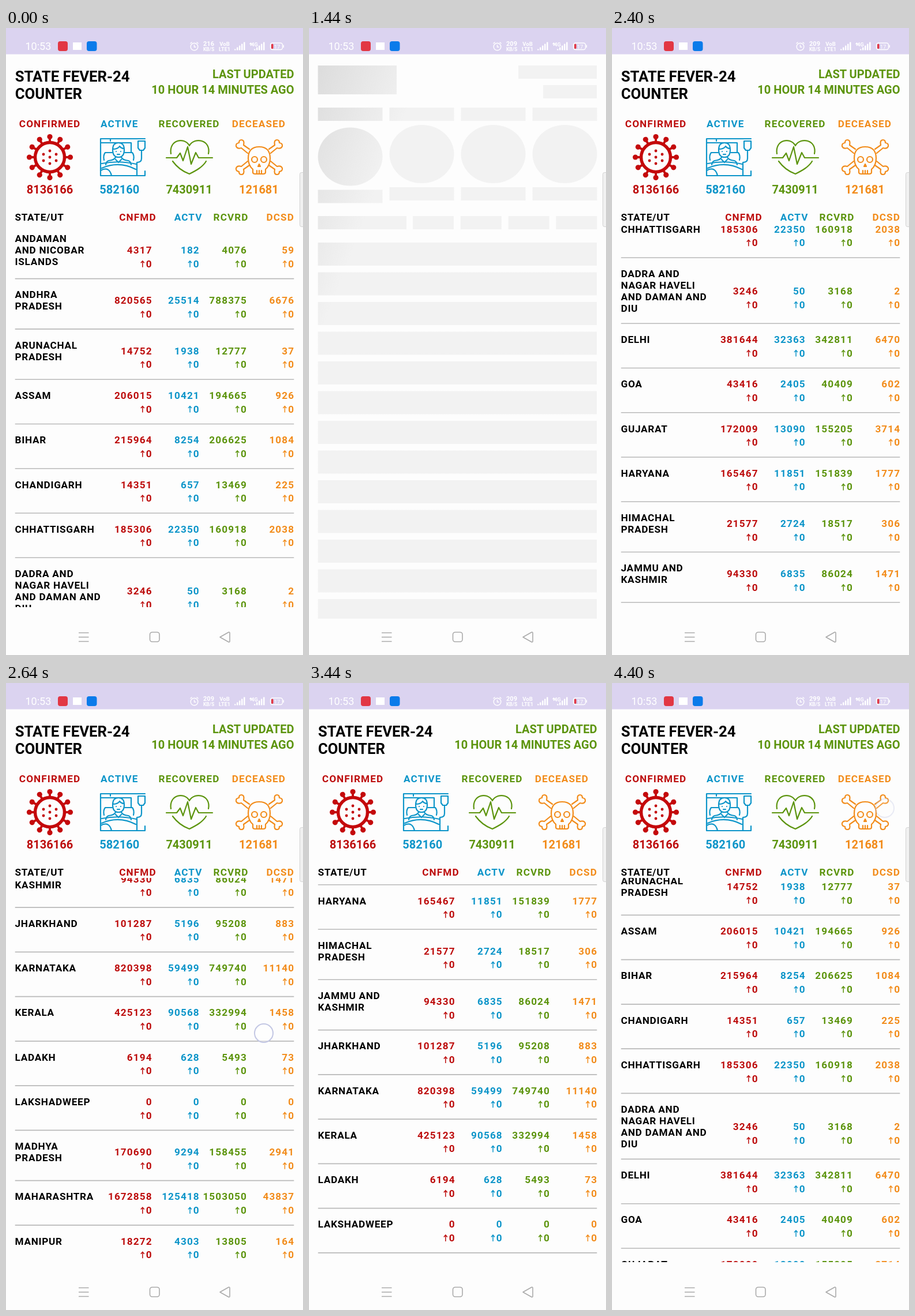
Recreate the animation shown at these times as an HTML page. Size 515 by 1087 pixels, loop 4480 ms.

```html
<!DOCTYPE html>
<html lang="en">
<head>
<meta charset="utf-8">
<title>Case counter</title>
<style>
  html, body { margin: 0; width: 100%; height: 100%; overflow: hidden; background: #fdfdfd; }
  svg { display: block; width: 515px; height: 1087px; font-family: Roboto, sans-serif; font-weight: 700; }
  .line { fill: none; stroke-width: 2.2; stroke-linecap: round; stroke-linejoin: round; }
  .spaced { font-size: 17.17px; letter-spacing: 1.1px; }
  .state { font-size: 17.17px; letter-spacing: .72px; }
  .mid { text-anchor: middle; }
  .end { text-anchor: end; }
</style>
</head>
<body>
<svg viewBox="0 0 515 1087">
  <defs>
    <clipPath id="listClip"><rect y="338" width="515" height="666"/></clipPath>
    <linearGradient id="shine" gradientUnits="userSpaceOnUse" x1="-177" y1="-68" x2="177" y2="68">
      <stop offset="0" stop-color="#f2f2f2"/>
      <stop offset=".5" stop-color="#dadada"/>
      <stop offset="1" stop-color="#f2f2f2"/>
    </linearGradient>
  </defs>
  <rect width="515" height="1087" fill="#fdfdfd"/>

  <g id="statusBar" fill="#fff">
    <rect width="515" height="45.5" fill="#dbd3f0"/>
    <text x="33.5" y="38" font-size="18" font-weight="400">10:53</text>
    <rect x="90" y="23" width="17" height="17" rx="4" fill="#e23744"/>
    <rect x="116" y="25" width="15" height="13"/>
    <rect x="140" y="23" width="17.5" height="17" rx="4" fill="#0b7bea"/>
    <g class="mid">
      <text id="speed" x="351.5" y="31" font-size="11"></text>
      <text x="351.5" y="39.5" font-size="8.5">KB/S</text>
      <text x="379" y="31" font-size="9.5">VoB</text>
      <text x="379" y="39.5" font-size="9">LTE1</text>
      <text x="431" y="31.5" font-size="9">4G</text>
    </g>
    <g fill="none" stroke="#fff" stroke-width="1.4">
      <circle cx="326.5" cy="32.5" r="6.3"/>
      <path d="M326.5 29v4h3M319.5 27l3-2.5M333.5 27l-3-2.5M424.5 31v-5m-2 2l2-2 2 2"/>
      <rect x="458.5" y="26" width="21" height="11.5" rx="3.5"/>
    </g>
    <g id="bars"></g>
    <rect x="460" y="27.5" width="3.5" height="8.5" rx="1.5" fill="#e23744"/>
    <text x="470" y="35.5" font-size="9.5" font-weight="400" class="mid">17</text>
    <rect x="480.5" y="29.5" width="1.5" height="4.5"/>
  </g>

  <g id="page">
    <g font-size="25.75"><text x="15.7" y="93">STATE FEVER-24</text><text x="15.7" y="123">COUNTER</text></g>
    <g font-size="20.03" fill="#5c940d" class="end">
      <text x="499.5" y="86.5">LAST UPDATED</text>
      <text x="499.5" y="113.8">10 HOUR 14 MINUTES AGO</text>
    </g>
    <g id="totals"></g>

    <g id="virus" fill="#c4090b" stroke="#c4090b">
      <circle cx="76" cy="224" r="25.5" fill="none" stroke-width="5.5"/>
    </g>
    <g class="line" stroke="#0d95c9">
      <path d="M164 192H241M164 192V256H227M181 192v4M164 199H217V216M229 196H241V208L238 212H232L229 208ZM235 212V226Q235 233 227 233V256H241V248"/>
      <path d="M185 211q0-12 10-12t10 12q0 13-10 13t-10-13ZM185 210q9 0 12-5 3 4 8 4M191 214v.1M199 214v.1M193 219h4"/>
      <path d="M190 224q-2 5-12 6-4 1-5 7M200 224q2 5 12 6 4 1 5 7M184 216H172q-4 5-2 13M206 216H219q4 5 2 13M190 228l5 5 5-5"/>
      <path d="M166 235Q195 229 226 236M166 243Q196 230 225 245M164 247q15-8 19 9"/>
    </g>
    <g class="line" stroke="#5c940d">
      <path d="M286 218C282 194 309 188 318 204C327 188 356 194 351 218M289 231C297 242 307 249 318 253C330 247 341 241 347 231"/>
      <path d="M278 225H296l6-8 5 13 8-24 6 30 8-20 5 9H358"/>
    </g>
    <g class="line" stroke="#f28c1b">
      <path d="M428 245Q420 238 420 226Q420 206 439 206T458 226Q458 238 450 245V250Q450 253 446 253H432Q428 253 428 250ZM435 247v5M439 247v5M443 247v5M437 240l2-4 2 4z"/>
      <circle cx="431" cy="228" r="5"/><circle cx="447" cy="228" r="5"/>
      <g id="bones"></g>
    </g>

    <text x="15.5" y="333.5" class="state">STATE/UT</text>
    <g id="columnHeads" class="spaced end"></g>
    <g clip-path="url(#listClip)"><g id="list"></g></g>
  </g>

  <g id="skeleton" fill="url(#shine)"></g>

  <g fill="none" stroke="#aaa" stroke-width="1.6" stroke-linejoin="round">
    <path d="M126 1048.5h17.5M126 1056h17.5M126 1063.5h17.5M371 1056L386 1047.5Q388 1047 388 1049V1063Q388 1065 386 1064.5Z"/>
    <rect x="249.5" y="1047.5" width="16.5" height="16.5" rx="4"/>
  </g>
  <rect x="509.5" y="250.5" width="9" height="94" rx="3" fill="#f1f1f1" stroke="#d2d2d2"/>
  <circle id="touch" r="16" fill="#fff" fill-opacity=".45" stroke="#c3c7e4" stroke-width="2"/>
</svg>

<script>
const LOOP = 4480, STEP = 80;
const COLORS = ['#bd0d0d', '#0d95c9', '#5c940d', '#f28c1b'];
const $ = id => document.getElementById(id);

// Name (lines split by "/") : confirmed recovered deceased [active, when it is not the remainder]
const STATES = `ANDAMAN/AND NICOBAR/ISLANDS:4317 4076 59
ANDHRA/PRADESH:820565 788375 6676
ARUNACHAL/PRADESH:14752 12777 37
ASSAM:206015 194665 926 10421
BIHAR:215964 206625 1084 8254
CHANDIGARH:14351 13469 225
CHHATTISGARH:185306 160918 2038
DADRA AND/NAGAR HAVELI/AND DAMAN AND/DIU:3246 3168 2 50
DELHI:381644 342811 6470
GOA:43416 40409 602
GUJARAT:172009 155205 3714
HARYANA:165467 151839 1777
HIMACHAL/PRADESH:21577 18517 306 2724
JAMMU AND/KASHMIR:94330 86024 1471
JHARKHAND:101287 95208 883
KARNATAKA:820398 749740 11140 59499
KERALA:425123 332994 1458 90568
LADAKH:6194 5493 73
LAKSHADWEEP:0 0 0
MADHYA/PRADESH:170690 158455 2941
MAHARASHTRA:1672858 1503050 43837 125418
MANIPUR:18272 13805 164
MEGHALAYA:9411 8193 88
MIZORAM:2694 2305 1
NAGALAND:8945 7237 36
ODISHA:288646 272363 1325
PUDUCHERRY:34908 30838 592
PUNJAB:133158 124870 4198
RAJASTHAN:195213 178053 1905
SIKKIM:3907 3521 67
TAMIL NADU:722011 688746 11101
TELANGANA:237187 217401 1330
TRIPURA:30674 28788 346
UTTAR/PRADESH:480082 449308 7006
UTTARAKHAND:62328 57107 1023
WEST BENGAL:369671 326009 6776`;

const text = (x, y, content, attrs = '') => `<text x="${x}" y="${y}" ${attrs}>${content}</text>`;
const rect = (x, y, w, h) => `<rect x="${x}" y="${y}" width="${w}" height="${h}"/>`;

function buildHeader() {
  const totals = [['CONFIRMED', 8136166], ['ACTIVE', 582160], ['RECOVERED', 7430911], ['DECEASED', 121681]];
  $('totals').innerHTML = totals.map(([label, value], i) => {
    const x = 76 + i * 120.8;
    return `<g class="mid" fill="${COLORS[i]}">` + text(x, 172, label, 'class="spaced"') +
      text(x, 286.5, value, 'font-size="20.03"') + '</g>';
  }).join('');

  const heads = [['CNFMD', 260.7], ['ACTV', 340.5], ['RCVRD', 420.6], ['DCSD', 500]];
  $('columnHeads').innerHTML = heads.map(([label, x], i) =>
    text(x, 333.5, label, `fill="${COLORS[i]}"`)).join('');

  for (let i = 0; i < 12; i++)
    $('virus').innerHTML += `<g transform="rotate(${i * 30} 76 224)" stroke="none">` +
      rect(74, 189, 4, 10) + '<circle cx="76" cy="188.5" r="4.6"/></g>';
  for (const [x, y] of [[0, -11], [0, 0], [0, 11], [-11, -5], [-11, 6], [11, -5], [11, 6]])
    $('virus').innerHTML += `<circle cx="${76 + x}" cy="${224 + y}" r="2.4" stroke="none"/>`;

  const bone = 'M-17-14L-27-21Q-25-30-31-30Q-35-30-35-25Q-41-24-40-19Q-38-14-31-16L-20-7';
  for (const [sx, sy] of [[1, 1], [-1, 1], [1, -1], [-1, -1]])
    $('bones').innerHTML += `<path d="${bone}" transform="translate(439 224) scale(${sx} ${sy})"/>`;

  for (const x of [396, 430])
    for (let i = 0; i < 5; i++) {
      const h = 2 + i * 3;
      $('bars').innerHTML += rect(x + i * 4, 38.5 - h, 2.5, h);
    }
}

function buildList() {
  let top = 337.4, html = '';
  for (const row of STATES.split('\n')) {
    const [name, data] = row.split(':');
    const lines = name.split('/');
    const [confirmed, recovered, deceased, active = confirmed - recovered - deceased] = data.split(' ').map(Number);
    const first = top + 28, middle = first + (lines.length - 1) * 10;
    lines.forEach((line, i) => html += text(15.5, first + i * 20 + 5.8, line, 'class="state"'));
    [confirmed, active, recovered, deceased].forEach((value, i) => {
      const right = 252.5 + i * 82.2, base = middle + 5.8, deltaBase = base + 23.6;
      html += `<g class="spaced end" fill="${COLORS[i]}">` + text(right + 1.1, base, value) +
        text(right + 1.1, deltaBase, 0) +
        `<path d="M${right - 15.7} ${deltaBase}v-11m-3 3.5l3-3.5 3 3.5" fill="none" stroke="${COLORS[i]}" stroke-width="1.5"/></g>`;
    });
    top = Math.max(middle + 49.26, first + (lines.length - 1) * 20 + 26);
    html += `<path d="M15.7 ${top}H499.3" stroke="#b9b9b9" stroke-width="1.6"/>`;
  }
  $('list').innerHTML = html;
}

function buildSkeleton() {
  let html = rect(15.5, 65, 136.5, 50) + rect(363, 65, 136, 23) + rect(406, 99, 93, 23) + rect(15.5, 326, 153.5, 23);
  for (let i = 0; i < 4; i++) {
    const x = 15.5 + i * 124, drop = i ? 0 : 4.5;
    html += rect(x, 138, 112, 23) + rect(x, 276 + drop, 112, 23) + rect(180 + i * 82.8, 326, 71, 23) +
      `<ellipse cx="${x + 56}" cy="${218.5 + drop}" rx="56" ry="50.5"/>`;
  }
  for (let i = 0; i < 13; i++) html += rect(15.5, 372 + i * 51.5, 483.5, i < 12 ? 40 : 34);
  $('skeleton').innerHTML = html;
}

// Keys are [time, ...values]; values run straight between keys.
function between(keys, t) {
  if (t <= keys[0][0]) return keys[0].slice(1);
  const next = keys.findIndex(key => key[0] > t);
  if (next < 0) return keys[keys.length - 1].slice(1);
  const a = keys[next - 1], b = keys[next], k = (t - a[0]) / (b[0] - a[0]);
  return a.slice(1).map((v, i) => v + (b[i + 1] - v) * k);
}

const SCROLL = [[2160, 0], [2400, 520], [2640, 1126.7], [2960, 2080], [3040, 2232], [3120, 2232],
  [3440, 914.2], [3840, 266.2], [4000, 225], [4240, 206.8]];
const SWIPES = [
  [[2160, 440, 840], [2320, 452, 420]],
  [[2560, 440, 800], [2640, 447, 607], [2720, 452, 400]],
  [[3120, 455, 320], [3280, 440, 780]],
  [[3840, 477, 202], [4400, 473, 217]]
];

function draw(t) {
  const loading = t >= 480 && t < 1920;
  const show = (id, on) => $(id).style.display = on ? '' : 'none';
  show('page', !loading);
  show('skeleton', loading && t >= 800);
  $('speed').textContent = t < 480 ? 216 : t < 3600 ? 209 : 299;

  const peak = 20 + 2.6 * (Math.max(0, t - 800) % 640);
  $('shine').setAttribute('gradientTransform', `translate(${peak * .933} ${peak * .36})`);
  $('list').setAttribute('transform', `translate(0 ${-between(SCROLL, t)[0]})`);

  const swipe = SWIPES.find(s => t >= s[0][0] && t <= s[s.length - 1][0]);
  show('touch', swipe);
  if (swipe) {
    const [x, y] = between(swipe, t);
    $('touch').setAttribute('transform', `translate(${x} ${y})`);
    $('touch').setAttribute('opacity', t >= 4400 ? .35 : 1);
  }
}

function tick() {
  draw(Math.floor(performance.now() % LOOP / STEP) * STEP);
  requestAnimationFrame(tick);
}

buildHeader();
buildList();
buildSkeleton();
tick();
</script>
</body>
</html>
```
